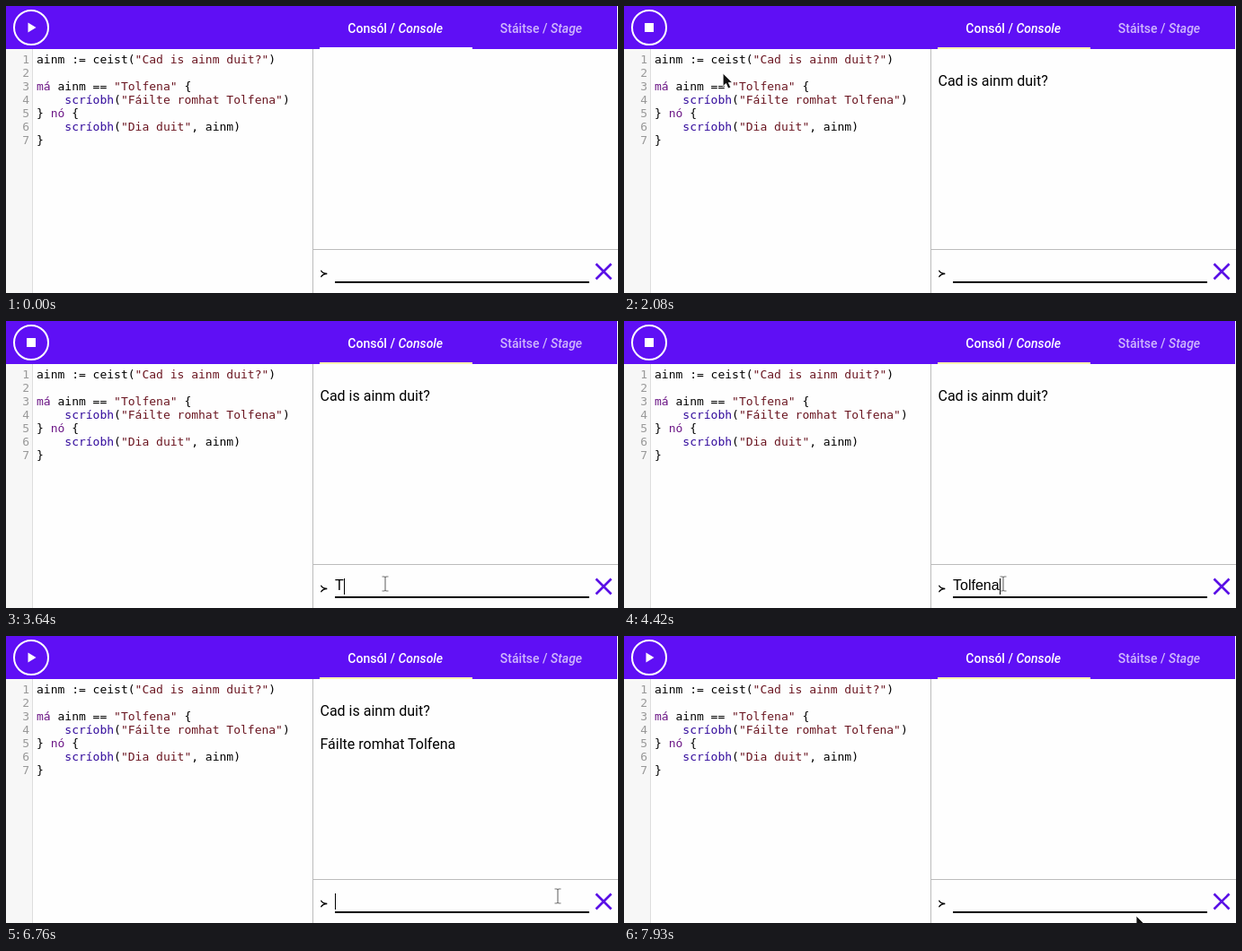
Write an HTML page that moves like this. It is 681 px wide and 320 px high and loops after 8000 ms.

```html
<!DOCTYPE html>
<html lang="ga">
<head>
<meta charset="utf-8">
<title>Console demo</title>
<style>
  html, body { margin: 0; width: 100%; height: 100%; overflow: hidden; background: #fefefe; }
  svg { display: block; width: 681px; height: 320px; }
  text { white-space: pre; }
  .code { font: 13px "DejaVu Sans Mono", monospace; }
  .num { fill: #999; text-anchor: end; }
  .kw { fill: #6b1585; }
  .str { fill: #6a1520; }
  .fn { fill: #320a9c; }
  .tab { font: 500 14px Roboto, sans-serif; fill: #fff; text-anchor: middle; }
  .tab tspan { font-style: italic; }
  .out { font: 16px Roboto, sans-serif; }
  .in { font: 16px "Liberation Sans", Arial, sans-serif; }
</style>
</head>
<body>
<svg viewBox="0 0 681 320">
  <rect y="48" width="29" height="272" fill="#f7f7f7"/>
  <path d="M29.5 48V320" stroke="#ddd"/>
  <g id="code" class="code"></g>

  <path d="M341.5 48V320M342 271.5H681" stroke="#bbb"/>
  <g class="out">
    <text id="question" x="349.5" y="89">Cad is ainm duit?</text>
    <text id="answer" x="349.5" y="126"></text>
  </g>
  <path d="M350.5 294.8Q352 298.3 357.3 298.5Q352 298.8 350.5 302.3" fill="none" stroke="#000" stroke-width="1.3"/>
  <text id="typed" class="in" x="366" y="300"></text>
  <path id="caret" d="M366.5 287V305" stroke="#000"/>
  <rect x="366" y="307" width="283" height="2"/>
  <path d="M656.5 287.5L673.5 304.5M673.5 287.5L656.5 304.5" stroke="#5a10e6" stroke-width="2.6"/>

  <rect width="680" height="48" fill="#5f0ff5"/>
  <circle cx="28" cy="24" r="19" fill="none" stroke="#fff" stroke-width="2"/>
  <path id="play" d="M24.5 18.5V29.5L33.5 24Z" fill="#fff"/>
  <rect id="stop" x="23" y="19" width="10" height="10" fill="#fff"/>
  <text class="tab" x="433.2" y="30">Consól / <tspan>Console</tspan></text>
  <text class="tab" x="595.5" y="30" opacity=".7">Stáitse / <tspan>Stage</tspan></text>
  <rect id="underline" x="349" y="46" width="170" height="2"/>

  <g id="pointer">
    <path id="arrow" d="M0 0V14.5L3.4 11.5L5.8 17L8.6 15.8L6.2 10.5H10.5Z" fill="#111" stroke="#fff" stroke-width=".8"/>
    <path id="hand" d="M-1.5 1Q0 -1 1.5 1V6Q3 5 4.3 6.2Q6 5.5 7 6.8Q9 6.3 9.5 8V12L8 16.5H0L-4.5 10Q-5 7.5 -3 8.2L-1.5 9.8Z" fill="#fff" stroke="#666" stroke-width=".8"/>
    <path id="beam" d="M-3.5 -8H-1L0 -7L1 -8H3.5M0 -7V7M-3.5 8H-1L0 7L1 8H3.5" fill="none" stroke="#777" stroke-width="1.2"/>
  </g>
</svg>
<script>
const LOOP = 8000, STEP = 130, NAME = "Tolfena";
const $ = id => document.getElementById(id);
const show = (id, on) => $(id).setAttribute("visibility", on ? "visible" : "hidden");
const within = (t, from, to) => t >= from && t < to;

const span = (kind, text) => `<tspan class="${kind}">${text}</tspan>`;
const lines = [
  `ainm := ceist(${span("str", '"Cad is ainm duit?"')})`,
  "",
  `${span("kw", "má")} ainm == ${span("str", `"${NAME}"`)} {`,
  `    ${span("fn", "scríobh")}(${span("str", `"Fáilte romhat ${NAME}"`)})`,
  `} ${span("kw", "nó")} {`,
  `    ${span("fn", "scríobh")}(${span("str", '"Dia duit"')}, ainm)`,
  "}"
];
$("code").innerHTML = lines.map((line, i) => {
  const y = 64 + 15 * i;
  return `<text class="num" x="26" y="${y}">${i + 1}</text><text x="34" y="${y}">${line}</text>`;
}).join("");
$("answer").textContent = `Fáilte romhat ${NAME}`;

// Pointer visits as [time, x, y]; the pointer is absent between visits.
const visits = [
  [[780, 215, 175], [1300, 40, 28], [1430, 36, 26], [1820, 36, 26],
   [2730, 410, 273], [3250, 422, 293], [5200, 422, 293]],
  [[6240, 598, 301], [6760, 614, 290], [7020, 664, 295], [7150, 664, 295],
   [7930, 570, 312], [8000, 566, 316]]
];

function pointerAt(t) {
  for (const path of visits) {
    for (let i = 1; i < path.length; i++) {
      const [t0, x0, y0] = path[i - 1], [t1, x1, y1] = path[i];
      if (!within(t, t0, t1)) continue;
      const u = (t - t0) / (t1 - t0), k = u * u * (3 - 2 * u);
      return [x0 + (x1 - x0) * k, y0 + (y1 - y0) * k];
    }
  }
  return null;
}

function pointerKind(x, y) {
  if (Math.hypot(x - 28, y - 24) < 20 || (x > 654 && y > 284)) return "hand";
  return within(x, 366, 650) && within(y, 283, 307) ? "beam" : "arrow";
}

function drawPointer(t) {
  const point = pointerAt(t);
  const kind = point && pointerKind(...point);
  for (const id of ["arrow", "hand", "beam"]) show(id, id === kind);
  if (point) $("pointer").setAttribute("transform", `translate(${point})`);
}

function draw(now) {
  const t = Math.floor(now % LOOP / STEP) * STEP;
  const running = within(t, 1820, 5200);
  show("play", !running);
  show("stop", running);
  show("question", within(t, 1820, 7150));
  show("answer", within(t, 5200, 7150));
  $("underline").setAttribute("fill", t < STEP ? "#fff" : "#fff2b0");

  const count = within(t, 3640, 5200) ? Math.min(NAME.length, (t - 3640) / STEP + 1) : 0;
  $("typed").textContent = NAME.slice(0, count);
  const width = count ? Math.round($("typed").getComputedTextLength()) : 0;
  $("caret").setAttribute("transform", `translate(${width})`);
  show("caret", within(t, 3250, 4940) || within(t, 5200, 5590) || within(t, 6500, 7150));
  drawPointer(t);
}

function tick() {
  draw(performance.now());
  requestAnimationFrame(tick);
}
tick();
</script>
</body>
</html>
```
